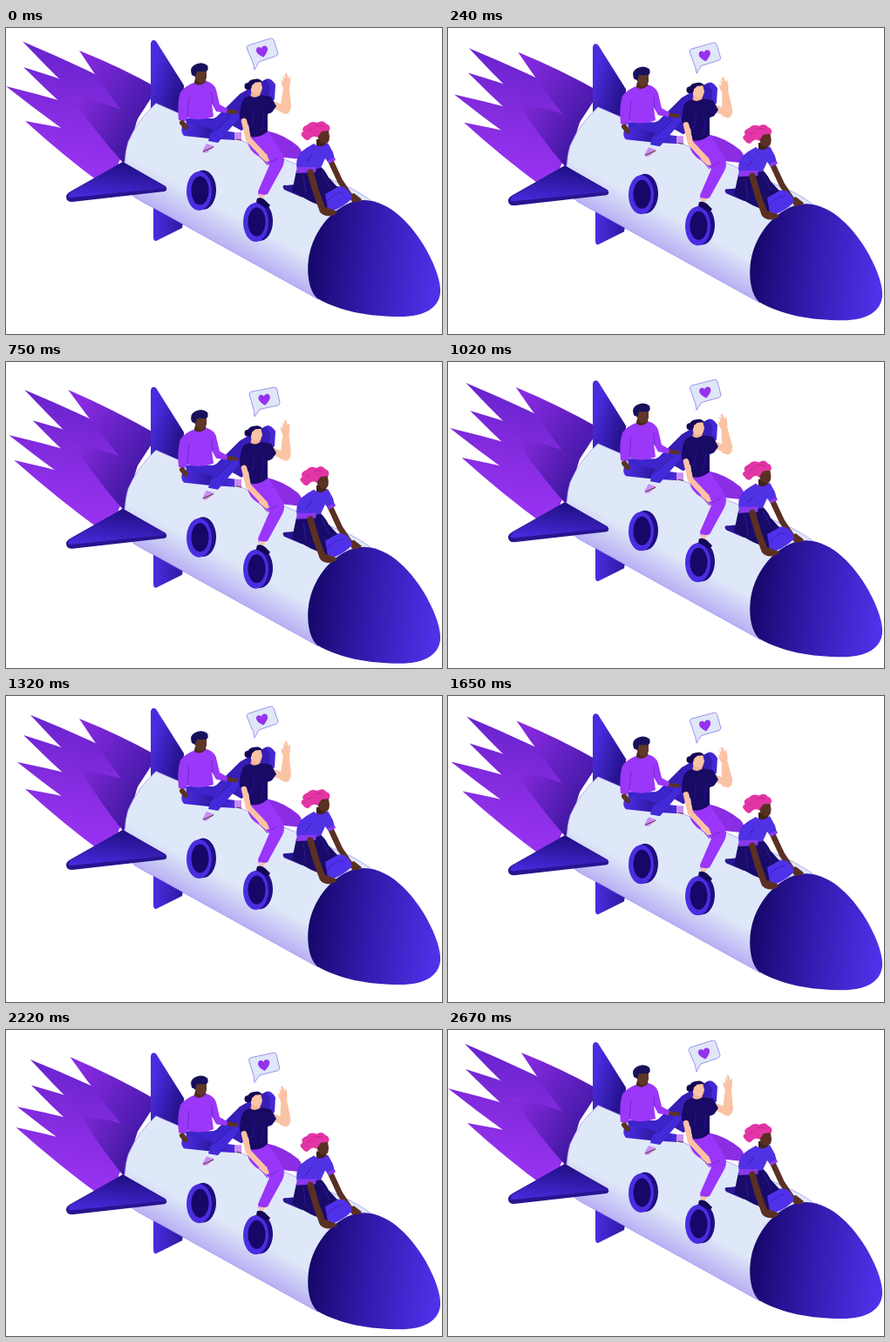
An HTML page for the animation above (2700 ms loop, 500 by 352 pixels).

```html
<!DOCTYPE html>
<html lang="en">
<head>
<meta charset="utf-8">
<title>Rocket ride</title>
<style>
html, body { margin: 0; width: 100%; height: 100%; overflow: hidden; background: #fff; }
svg { display: block; width: 100vw; height: 100vh; }
.limb { fill: none; stroke-linecap: round; stroke-linejoin: round; }
</style>
</head>
<body>
<svg viewBox="0 0 500 352">
  <defs>
    <linearGradient id="flame" gradientUnits="userSpaceOnUse" x1="75" y1="15" x2="50" y2="150">
      <stop stop-color="#6423cb"/><stop offset=".5" stop-color="#802adc"/><stop offset="1" stop-color="#9632ef"/>
    </linearGradient>
    <linearGradient id="core" gradientUnits="userSpaceOnUse" x1="76" y1="82" x2="156" y2="128">
      <stop stop-color="#8a2be0"/><stop offset="1" stop-color="#3a169c"/>
    </linearGradient>
    <linearGradient id="crest" gradientUnits="userSpaceOnUse" x1="85" y1="30" x2="168" y2="90">
      <stop stop-color="#8a2be2"/><stop offset="1" stop-color="#4419a8"/>
    </linearGradient>
    <linearGradient id="hull" gradientUnits="userSpaceOnUse" x1="294" y1="150" x2="241" y2="246">
      <stop stop-color="#dfe8f8"/><stop offset=".66" stop-color="#dfe8f8"/><stop offset="1" stop-color="#b9b2f4"/>
    </linearGradient>
    <linearGradient id="nose" gradientUnits="userSpaceOnUse" x1="348" y1="262" x2="496" y2="280">
      <stop stop-color="#16076a"/><stop offset=".45" stop-color="#3319ab"/><stop offset="1" stop-color="#5031ea"/>
    </linearGradient>
    <linearGradient id="fin" gradientUnits="userSpaceOnUse" x1="124" y1="196" x2="128" y2="156">
      <stop stop-color="#4628d8"/><stop offset="1" stop-color="#211086"/>
    </linearGradient>
    <linearGradient id="fin2" gradientUnits="userSpaceOnUse" x1="168" y1="50" x2="202" y2="60">
      <stop stop-color="#4a2ce0"/><stop offset="1" stop-color="#27138f"/>
    </linearGradient>
    <linearGradient id="fin3" gradientUnits="userSpaceOnUse" x1="170" y1="225" x2="204" y2="225">
      <stop stop-color="#4a2ce0"/><stop offset="1" stop-color="#2d189e"/>
    </linearGradient>
    <linearGradient id="jeans" gradientUnits="userSpaceOnUse" x1="203" y1="115" x2="265" y2="115">
      <stop stop-color="#4a2de4"/><stop offset=".5" stop-color="#3019a4"/><stop offset="1" stop-color="#4a2de4"/>
    </linearGradient>
    <g id="port">
      <ellipse cx="226" cy="186.300" rx="15" ry="22.800" fill="#1f0f82"/>
      <ellipse cx="221.500" cy="187.500" rx="14.500" ry="22.500" fill="#4a2de0"/>
      <ellipse cx="222.500" cy="187" rx="10" ry="16.500" fill="#170768"/>
    </g>
  </defs>

  <g id="ship">
    <g id="fire"></g>

    <!-- rear fins -->
    <path d="M166 18Q167 12 172 15L204 66L203 102L166 93Z" fill="url(#fin2)"/>
    <path d="M242 102L270 75L298 59Q303 56 309 65L308 82L270 118Z" fill="#4429d4"/>
    <path d="M242 102L268 76L298 59L303 68L300 92L270 118Z" fill="#361eb6"/>
    <path d="M169 200L204 218L202 230L174 244Q169 247 169 240Z" fill="url(#fin3)"/>

    <!-- hull -->
    <path d="M172 86.500Q150 107 140 131Q133 153 139 184Q143 193 153 198L358 312L424 203Q414 194 395 184Z" fill="url(#hull)" stroke="#8d7cec" stroke-width=".6"/>
    <path d="M411 198C441 199 466 227 482 255C493 275 499 293 498 305C496 322 480 332 452 332C416 332 383 326 357 311C346 302 343 274 350 252C360 221 386 198 411 198Z" fill="url(#nose)"/>
    <use href="#port"/><use href="#port" x="65" y="36"/>

    <!-- near fin -->
    <path d="M134 154L183 182Q186 186 182 188L76 200Q69 200 69 194Q69 191 74 188Z" fill="#28148f"/>
    <path d="M134 154L184 184L76 195Q68 196 74 189Z" fill="url(#fin)"/>

    <!-- seated man -->
    <g>
      <path d="M206 104L238 104L258 94Q266 92 267 100L262 109L242 118L208 118Z" fill="#3d24cb"/>
      <path d="M203 111Q199 119 204 124L232 127L263 129L263 120L240 117L214 110Z" fill="url(#jeans)"/>
      <path d="M234 122L261 97Q269 95 267 104L243 132L232 130Z" fill="#432ad8"/>
      <path d="M240 118L258 101" stroke="#2a1799"/>
      <path d="M230 133L239 136L231 143Q224 145 226 140Z" fill="#c88df5"/>
      <path d="M262 120L270 120L270 130L262 128Z" fill="#c88df5"/>
      <path d="M226 142L238 137M264 128L270 129" stroke="#5b3324" stroke-width="1"/>
      <path class="limb" d="M250 95L264 97" stroke="#5b3324" stroke-width="4.500"/>
      <path d="M217 58L229 58L230 67Q222 72 215 66Z" fill="#4b291f"/>
      <path d="M215 63Q222 69 230 61Q239 64 241 71L245 88L254 93L253 98L241 96L236 87L238 102Q222 108 208 103L206 107L198 106Q196 86 200 74Q205 67 215 63Z" fill="#9a37f8"/>
      <path d="M210 80L208 102M236 74L237 88" stroke="#7427cc" fill="none"/>
      <path class="limb" d="M202 109L206 114" stroke="#5b3324" stroke-width="6"/>
      <path d="M216 47H230V57Q228 64 222 63Q216 60 216 51Z" fill="#5f3728"/>
      <path d="M213 54Q210 45 217 42Q225 38 231 43Q233 49 229 50L219 50L217 56Z" fill="#17105c"/>
    </g>

    <!-- waving woman -->
    <g>
      <path d="M298 118Q318 122 335 136Q342 143 338 151L319 149L296 140Z" fill="#8a2de3"/>
      <path d="M278 123L300 118L317 144Q321 152 317 160L300 191L290 194L289 188L302 158L290 148Q278 141 277 130Z" fill="#9a35fa"/>
      <path d="M300 158L292 148M312 150L303 154" stroke="#7a27cf" fill="none"/>
      <path d="M290 191L297 192L295 196L290 196Z" fill="#fac3a4"/>
      <path d="M288 196Q293 194 297 198L303 204Q301 208 296 206L287 200Z" fill="#130756"/>
      <path class="limb" d="M306 88L321 94" stroke="#fac3a4" stroke-width="8"/>
      <g id="arm">
        <path d="M314 96L318 69Q315 64 316 59L318 62L318 54L320 58L320 52L322 52L324 58L326 55L326 63L325 69L327 90Q326 99 320 99Z" fill="#fac3a4"/>
      </g>
      <path d="M282 71H291L292 80Q286 84 280 80Z" fill="#f5b394"/>
      <path d="M280 78Q286 82 292 77L304 79L310 90L305 97L300 99L300 119Q291 127 280 125L278 111L268 104Q268 92 271 84Q274 79 280 78Z" fill="#180a65"/>
      <path d="M282 112L285 94M296 97L293 118" stroke="#2d1994" fill="none" stroke-width=".8"/>
      <path class="limb" d="M273 107L278 128L294 145" stroke="#fac3a4" stroke-width="6.500"/>
      <path d="M291 141L299 145L302 153L298 154L290 147Z" fill="#fac3a4"/>
      <path d="M281 61H292L294 69L292 75Q287 78 281 73Z" fill="#fac3a4"/>
      <circle cx="277.500" cy="67" r="4" fill="#130756"/>
      <path d="M277 66Q277 60 284 59Q291 57 294 62L286 62.500L282 66L281 70Z" fill="#130756"/>
    </g>

    <!-- kneeling woman -->
    <g>
      <path class="limb" d="M371 150L383 176L395 194" stroke="#5a3023" stroke-width="6.500"/>
      <path d="M392 192L399 190L408 197Q405 201 397 200Z" fill="#5a3023"/>
      <path d="M332 180L340 195L319 186Q315 180 322 181Z" fill="#2a1796"/>
      <path d="M356 187Q372 180 388 183Q396 189 397 196Q388 205 376 210Q366 211 360 203Z" fill="#4f31ea"/>
      <path d="M368 200Q376 190 386 189" stroke="#3b21bb" fill="none"/>
      <path d="M333 164L359 158Q365 162 370 172L380 183L366 191L369 208L350 200L328 188Z" fill="#190b69"/>
      <path d="M341 169L344 192M350 166L358 198M362 165L371 183" stroke="#3420a0" fill="none" stroke-width=".8"/>
      <g id="lean">
        <path d="M356 128L367 128L368 138L356 140Z" fill="#41221b"/>
        <path d="M353 133Q360 140 369 132L375 143L377 151L369 154L366 150L361 161L334 165Q331 151 338 143Q345 137 353 133Z" fill="#5131e4"/>
        <path d="M334 160L356 160L355 166L333 167ZM369 152L377 149L378 152L370 156Z" fill="#8a38ef"/>
        <path d="M344 155L351 146" stroke="#371db4"/>
        <g id="head">
          <path d="M357 117L370 118L371 125Q371 134 364 133Q356 130 357 117Z" fill="#5a3023"/>
          <path d="M341 126Q336 122 341 119Q338 114 346 111Q350 106 357 109Q364 105 367 110Q373 112 371 118L362 119L357 126Q353 123 349 127Q345 132 341 126Z" fill="#e335a5"/>
          <path d="M354 113Q360 110 364 114M346 119L351 116" stroke="#b9218b" fill="none" stroke-width=".8"/>
        </g>
      </g>
      <path class="limb" d="M349 166L356 190L363 209" stroke="#5a3023" stroke-width="7.500"/>
      <path d="M359 207L367 206L380 211Q378 217 367 216Q359 214 359 207Z" fill="#5a3023"/>
    </g>

    <!-- message -->
    <g id="note">
      <path d="M278 20L303 12Q306 11 307 14L312 29Q312 31 310 32L290 39L285 48L283.500 41L276 23Q276 21 278 20Z" fill="#dfe7f8" stroke="#7f6bea" stroke-width=".7"/>
      <path d="M295.500 33.500C290 31.500 286 28 287 24.500C288 21.500 291 21.500 293 23.500C293.500 20.500 297 19.500 299 21.500C302 25 298 30 295.500 33.500Z" fill="#9632ef"/>
    </g>
  </g>
</svg>
<script>
const $ = id => document.getElementById(id);
const NS = "http://www.w3.org/2000/svg";
const LOOP = 2700;

// tip, two root points, travel of the tip, period, paint
const spikes = [
  { tip: [19, 15.5], a: [164, 84], b: [128, 122], run: 9, period: 900, fill: "flame" },
  { tip: [20, 45], a: [150, 92], b: [124, 140], run: 11, period: 1350, fill: "flame" },
  { tip: [0, 67], a: [140, 108], b: [128, 160], run: 13, period: 900, fill: "flame" },
  { tip: [22, 107], a: [142, 134], b: [112, 181], run: -13, period: 1350, fill: "flame" },
  { tip: [84, 26], a: [174, 69], b: [146, 112], run: -13, period: 1350, fill: "crest" },
  { tip: [73, 77], a: [152, 101], b: [135, 156], run: 13, period: 900, fill: "core" }
];

for (const s of spikes) {
  s.el = document.createElementNS(NS, "path");
  s.el.setAttribute("fill", `url(#${s.fill})`);
  $("fire").append(s.el);
}

const swing = (t, period) => Math.sin(Math.PI * t / period) ** 2;
const place = (id, value) => $(id).setAttribute("transform", value);

function spikePath(s, t) {
  const k = s.run * swing(t, s.period);
  const x = s.tip[0] + k, y = s.tip[1] + k * 0.7;
  // edges bulge slightly outwards from the straight line
  const bend = (p, d) => [(x + p[0]) / 2 + d * 0.5, (y + p[1]) / 2 - d];
  return `M${x} ${y}Q${bend(s.a, 3)} ${s.a}L${s.b}Q${bend(s.b, -3)} ${x} ${y}Z`;
}

function draw(t) {
  const bob = swing(t, 1350);
  place("ship", `translate(0 ${15.3 * bob})`);
  place("note", `rotate(${7 * bob} 285 48)`);
  place("arm", `rotate(${-10 * swing(t, 675)} 321 95)`);
  place("lean", `translate(0 ${-bob})`);
  place("head", `translate(${-1.2 * bob} ${-bob})`);
  for (const s of spikes) s.el.setAttribute("d", spikePath(s, t));
}

const start = performance.now();
function tick() {
  draw((performance.now() - start) % LOOP);
  requestAnimationFrame(tick);
}
draw(0);
requestAnimationFrame(tick);
</script>
</body>
</html>
```
